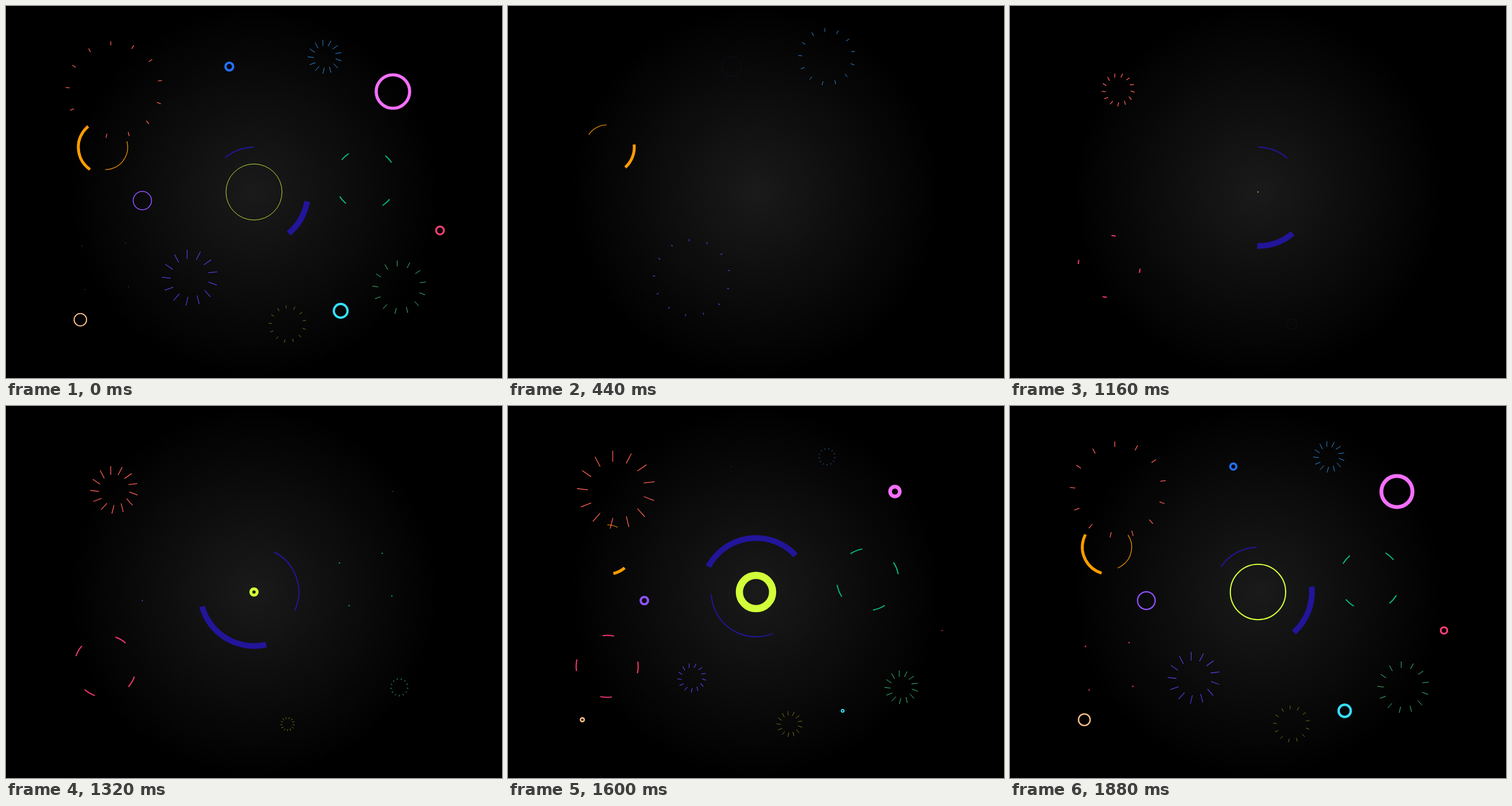
These frames come from a looping animation (864 by 648 pixels, 1920 ms). An HTML page with a canvas:

```html
<!DOCTYPE html>
<html>
<head>
<meta charset="utf-8">
<style>
html, body { margin: 0; width: 100%; height: 100%; overflow: hidden; background: #000; }
canvas { display: block; }
</style>
</head>
<body>
<canvas id="stage" width="864" height="648"></canvas>
<script>
const LOOP = 1920, SPAN = 960;
const c = document.getElementById('stage').getContext('2d');

const glow = c.createRadialGradient(432, 324, 0, 432, 324, 324);
glow.addColorStop(0, '#1a1a1a');
glow.addColorStop(1, '#000');

// x, y, end radius, start time, colour
const bursts = [
  [188.5, 146, 84.5, 960, '#ff6058'],
  [490.4, 554, 34, 1090, '#d8c433'],
  [685.1, 490, 51.5, 1172, '#4be38e'],
  [320.3, 473.5, 67.5, 1360, '#5d4aff'],
  [555.5, 88.5, 50.5, 1475, '#3fa4ff']
];
// x, y, end radius, delay, colour
const rings = [
  [432, 324, 49, 0, '#d2ff3a'],
  [674, 149, 33.5, 170, '#f56fff'],
  [237.5, 339, 16.9, 100, '#9052ff'],
  [129.5, 546.5, 12.3, 160, '#ffc48c'],
  [583, 531, 16.6, 258, '#35e0ff'],
  [389, 105.5, 17, 412, '#2470ff'],
  [756, 391, 12.9, 348, '#ff3f74']
];
// x, y, thick radius and width, thin radius and width, start time, colour
const orbits = [
  [432, 324, 94, 10, 78, 2, 960, '#22159a'],
  [173, 246, 47, 5, 39, 1.2, 1440, '#ff9d00']
];
// x, y, first angle, delay, colour
const dashes = [
  [172.7, 453.5, 0, 0, '#f5386e'],
  [626.5, 302.3, 30, 240, '#08b581']
];

const clamp = x => Math.min(1, Math.max(0, x));
const smooth = x => { x = clamp(x); return x * x * (3 - 2 * x); };
const rad = deg => deg * Math.PI / 180;

// cubic-bezier(.564, 0, .583, 1)
function ringEase(x) {
  x = clamp(x);
  let lo = 0, hi = 1;
  for (let i = 0; i < 20; i++) {
    const u = (lo + hi) / 2, v = 1 - u;
    if (3 * u * v * (0.564 * v + 0.583 * u) + u * u * u < x) lo = u; else hi = u;
  }
  return smooth(lo);
}

function arc(x, y, r, from, to, width, color) {
  if (to - from < 0.05 || r <= 0) return;
  c.beginPath();
  c.arc(x, y, r, rad(from), rad(to));
  c.lineWidth = width;
  c.strokeStyle = color;
  c.stroke();
}

// Back and front of a stroke that runs from 0 to 1
const trim = (t, start) => [smooth((t - start - 200) / SPAN), smooth((t - start) / SPAN)];

function burst(t, [x, y, r, start, color]) {
  const [tail, lead] = trim(t, start).map(p => r * (0.25 + 0.75 * p));
  if (lead - tail < 0.05) return;
  c.strokeStyle = color;
  c.lineWidth = r / 65;
  for (let i = 0; i < 13; i++) {
    c.save();
    c.translate(x, y);
    c.rotate(2 * Math.PI * i / 13);
    c.beginPath();
    c.moveTo(-0.071 * r, -tail);
    c.lineTo(-0.071 * r, -lead);
    c.stroke();
    c.restore();
  }
}

function ring(t, [x, y, r, delay, color]) {
  t -= delay;
  const s = ringEase((t - 1060) / 900);
  const width = 1.27 * r * s * (1 - smooth((t - 1000) / 990));
  if (width > 0.03) arc(x, y, r * s, 0, 360, width, color);
}

function orbit(t, [x, y, r1, w1, r2, w2, start, color]) {
  const [tail, lead] = trim(t, start).map(p => 50 + 360 * p);
  arc(x, y, r1, tail, lead, w1, color);
  arc(x, y, r2, tail - 140, lead - 140, w2, color);
}

function dash(t, [x, y, first, delay, color]) {
  t -= delay;
  const p = smooth((t - 1000) / 860);
  const lead = first + 131.5 * p;
  const tail = first + 47 * p + 84.5 * smooth((t - 1215) / 745);
  for (let a = 0; a < 360; a += 90) arc(x, y, 54, a + tail, a + lead, 2, color);
}

function draw(now) {
  let t = now % LOOP;
  if (t < 760) t += LOOP; // the show runs on past the loop point
  c.fillStyle = glow;
  c.fillRect(0, 0, 864, 648);
  orbits.forEach(o => orbit(t, o));
  dashes.forEach(d => dash(t, d));
  bursts.forEach(b => burst(t, b));
  rings.forEach(r => ring(t, r));
  requestAnimationFrame(draw);
}
requestAnimationFrame(draw);
</script>
</body>
</html>
```
